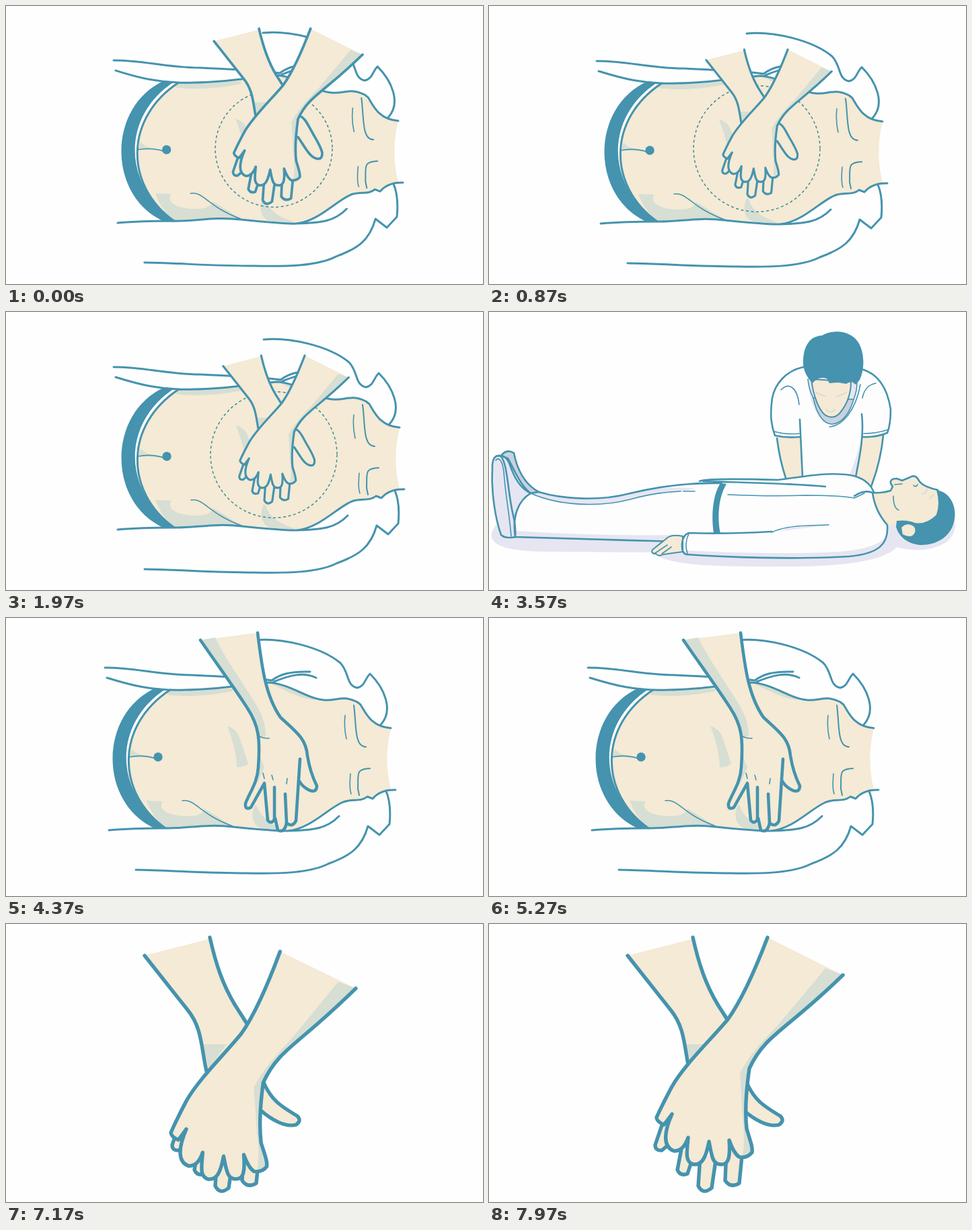
An HTML page that plays this animation: 709 px wide and 414 px high, repeating every 8000 ms.

```html
<!DOCTYPE html>
<html lang="en">
<head>
<meta charset="utf-8">
<title>Chest compressions</title>
<style>
html, body { margin: 0; width: 100%; height: 100%; overflow: hidden; background: #fefefe; }
svg { display: block; width: 709px; height: 414px; }
path, circle { fill: none; stroke-linecap: round; stroke-linejoin: round; }
.line { stroke: #4593ae; stroke-width: 3; }
#patient .line { stroke-width: 2.6; }
.thin { stroke: #4593ae; stroke-width: 1.6; }
.bold { stroke: #4593ae; stroke-width: 5.4; }
.skin { fill: #f4ead5; }
.shade { fill: #d7ded3; }
.dusk { fill: #c9d2de; }
.soft { fill: #e6e6f2; }
.cloth { fill: #fdfdfe; }
.teal { fill: #4593ae; }
.faint { stroke: #d3d9d8; stroke-width: 1.6; }
</style>
</head>
<body>
<svg viewBox="0 0 709 414">
<defs>
  <g id="torso">
    <path class="skin" d="M257 115C300 118 350 110 403 104C435 106 460 128 485 130C505 132 512 122 535 133C548 148 556 168 585 172C577 205 578 235 585 263C570 264 562 278 550 274C540 283 525 276 512 283C490 293 465 322 432 325C400 322 370 318 350 319C310 314 280 322 250 321C176 268 176 168 257 115Z"/>
    <path class="shade" d="M222 280L246 281C236 296 262 304 285 303C300 303 306 298 308 292L350 318L300 317L248 320Q230 302 222 280Z"/>
    <path class="shade" d="M383 286C376 302 380 316 392 321L438 325C412 318 392 308 386 288Z"/>
    <path class="shade" d="M257 116L350 113L350 117C315 124 280 126 252 122Z"/>
    <path class="shade" d="M342 169Q355 172 360 186L373 225Q366 231 356 230Q356 205 342 169Z"/>
    <path class="shade" d="M405 105C440 107 462 124 482 130C455 132 430 116 405 105ZM197 214L200 203Q206 212 232 217Z"/>
    <path class="teal" d="M236 112C150 150 150 285 236 322L252 321C172 267 172 165 250 114Z"/>
    <path class="line" d="M257 115C176 168 176 268 250 321"/>
    <circle class="teal" cx="239" cy="215" r="6.7"/>
    <path class="thin" d="M196 215Q217 211 234 217M275 280C295 277 300 300 350 318M517 153Q515 172 519 188M525 240Q523 262 526 270"/>
    <path class="line" style="stroke-width:2" d="M530 138C534 165 530 200 548 200M554 232C532 233 537 240 536 262L538 272"/>
    <path class="line" d="M160 82C200 81 240 93 290 93C340 96 380 96 408 101C420 92 435 87 465 88M411 103C435 93 455 88 474 97M163 97C195 107 230 117 280 115C325 115 360 108 403 104C435 106 460 128 485 130C505 132 512 122 535 133L540 137C548 150 556 170 585 172"/>
    <path class="line" d="M383 41C420 37 480 50 510 75C524 90 518 108 535 112C547 109 546 99 554 91C575 112 590 145 570 167"/>
    <path class="line" d="M166 324C200 321 225 321 250 321C280 322 310 314 350 319C380 322 420 326 432 325C470 324 490 322 508 303M432 325C465 322 490 293 512 283C525 276 540 283 550 274L558 277Q570 263 592 264M206 383C260 384 310 388 370 388C420 389 465 388 492 374C525 362 542 350 551 318L568 331L583 315Q586 285 578 266"/>
  </g>

  <g id="under">
    <path class="skin" d="M206 47L303 22C312 60 322 90 340 120L361 153L300 222C292 185 292 160 278 140Z"/>
    <path class="shade" d="M293 179L328 179L301 216Z"/>
    <path class="bold" d="M206 47L270 128C292 155 290 185 298 219L304 223M303 20C312 60 322 90 340 120L361 153"/>
    <path class="skin bold" d="M262 285L247 329Q247 338 257 337L264 331L272 300M286 335L280 366Q284 376 295 372L304 345M314 345L311 390Q318 404 331 393L338 345M353 335L351 382Q359 394 372 386L377 335"/>
  </g>

  <g id="over">
    <path class="skin" d="M414 20L526 76C440 160 410 165 387 215Q379 270 383 305C389 325 392 332 391 340Q384 349 372 347Q364 342 357 322C359 350 355 358 346 358C332 359 331 345 327 324C322 350 316 359 304 358C291 355 294 340 296 318C291 332 285 338 275 338C258 332 260 310 272 283L260 299Q249 294 249 288Q258 268 272 242C290 210 330 172 355 142C378 110 398 62 414 20Z"/>
    <path class="shade" d="M500 66L526 76C440 160 410 165 387 215Q379 270 383 305L391 338Q384 347 377 345Q381 320 377 290L373 222Q388 192 430 150Z"/>
    <path class="bold" d="M526 76C440 160 410 165 387 215Q379 270 383 305C389 325 392 332 391 340Q384 349 372 347Q364 342 357 322C359 350 355 358 346 358C332 359 331 345 327 324C322 350 316 359 304 358C291 355 294 340 296 318C291 332 285 338 275 338C258 332 260 310 272 283L260 299Q249 294 249 288Q258 268 272 242C290 210 330 172 355 142C378 110 398 62 414 20"/>
  </g>
</defs>

<g id="press">
  <use id="chest" href="#torso"/>
  <circle id="ring" cx="398" cy="212.5" r="94" stroke="#3f8b97" stroke-width="1.5" stroke-dasharray="4 3.6" style="stroke-linecap:butt"/>
  <g id="pump">
    <g transform="translate(167 20) scale(.69)">
      <use href="#under"/>
      <path class="skin bold" d="M387 208C402 208 410 232 420 248C428 262 436 275 439 287Q440 301 430 301C412 299 402 275 387 254"/>
      <use href="#over"/>
    </g>
  </g>
</g>

<g id="patient">
  <path class="soft" d="M12 315C-8 340 5 357 90 357L245 358C258 374 310 379 400 379C510 381 585 374 606 350C645 362 700 350 692 310L600 300L280 325Z"/>

  <path class="skin" d="M428 186L463 188L466 248L441 248Q432 220 428 186ZM555 187L586 183Q582 220 566 266L544 246Z"/>
  <path class="line" d="M428 188Q432 220 441 247M586 184Q582 225 566 265"/>
  <path class="cloth" d="M467 82C440 88 425 108 421 128C417 155 420 170 425 184L463 187L466 248L545 248L555 186L592 180Q597 168 597 145C592 112 578 92 554 85Z"/>
  <path class="soft" d="M553 188L545 248L533 247Q546 222 553 188Z"/>
  <path class="line" d="M467 82C440 88 425 108 421 128C417 155 420 170 425 184Q443 188 462 186M554 85C578 92 592 112 597 145Q597 168 592 180Q575 187 556 186M462 160L466 246M554 152C558 185 550 220 545 246"/>
  <path class="thin" d="M424 178Q442 183 461 181M557 181Q576 181 594 175M434 116C446 104 458 112 461 138M555 128C558 112 567 108 575 106"/>
  <path class="soft" d="M474 92C472 130 490 167 510 167C530 165 548 135 547 100Z"/>
  <path class="dusk thin" d="M482 128C487 152 497 167 510 167C524 166 536 152 542 130Z"/>
  <path class="thin" d="M474 100C475 112 478 120 482 128M547 105Q547 118 542 130M506 171C525 170 545 147 552 108"/>
  <path class="skin line" style="stroke-width:2" d="M479 100C482 125 490 145 499 153Q511 161 521 151C532 138 538 122 538 104Z"/>
  <path class="faint" d="M486 120L500 126M517 126L531 120M501 145Q508 153 514 145"/>
  <path class="teal" d="M467 72C468 50 477 36 495 35C511 25 546 26 554 57C558 72 557 88 551 101L545 108L538 103L531 107L519 105L506 106L502 99Q490 95 481 106C472 97 466 85 467 72Z"/>

  <path class="dusk line" d="M18 214Q26 203 37 210C42 235 52 256 74 268L62 270C46 258 38 235 28 218Z"/>
  <path class="soft line" d="M14 214Q25 213 30 225C38 248 46 262 62 270C45 280 34 302 39 335L22 335Z"/>
  <path class="cloth" d="M62 270L74 268C110 279 165 282 210 270C255 259 300 254 345 255L313 252Q325 247 430 250C470 245 495 239 530 242C552 244 566 254 572 268C574 290 585 305 592 317C594 345 580 360 535 364C450 369 350 365 293 361L285 342C200 340 100 337 39 335C33 300 45 280 62 270Z"/>
  <path class="soft" d="M40 326Q160 334 290 332L285 341Q160 340 40 335ZM62 270L74 268C110 279 165 282 210 270Q255 258 307 263L285 268Q250 269 210 279C165 291 105 289 62 270ZM292 355Q430 362 520 357Q575 353 591 334C588 354 565 363 520 364Q400 368 293 361ZM430 327Q455 317 505 318Q470 321 430 327Z"/>
  <path class="soft line" d="M5 235C4 217 10 212 18 215C28 228 28 270 36 303Q40 320 39 335Q25 338 18 332C10 310 3 270 5 235Z"/>
  <path class="thin" d="M10 221C15 215 20 222 22 238C24 270 30 298 33 334"/>
  <path class="line" d="M62 270C45 280 34 302 39 335C100 337 200 340 285 342M62 270L74 268C110 279 165 282 210 270C255 259 300 254 345 255M313 252Q325 247 430 250C470 245 495 239 530 242C552 244 566 254 572 268M318 252C380 254 450 255 500 260"/>
  <path class="thin" d="M62 270C105 289 165 291 210 279Q250 268 285 267M289 267L306 267M355 272Q420 275 470 273Q520 273 543 277L558 270M420 328Q440 319 475 318L505 317"/>
  <path class="teal" d="M344 255L353 256C341 276 339 305 344 330L334 330C330 300 333 272 344 255Z"/>
  <path class="skin line" style="stroke-width:2" d="M288 334Q270 330 263 338L243 354Q240 360 248 360Q252 365 259 361L288 357Z"/>
  <path class="thin" d="M247 359L265 347M257 360L271 350"/>
  <path class="line" d="M420 327Q350 331 297 329Q288 332 287 345Q286 359 293 361C350 365 450 369 535 364C580 360 594 345 592 318"/>
  <path class="thin" d="M297 330Q290 345 295 360"/>

  <path class="skin" d="M570 269Q585 270 597 266L597 256Q595 248 608 248L614 251L626 246Q634 241 639 251Q644 260 667 265L674 300L640 320L592 317C582 305 573 290 570 269Z"/>
  <path class="line" d="M543 274Q558 264 570 269Q585 270 597 266L600 260L597 255Q596 248 606 248L614 251L626 246Q634 241 639 251Q644 260 667 265M570 269C573 290 582 306 592 317"/>
  <path class="thin" d="M601 274Q601 292 609 295M603 257L614 256M631 258Q634 262 637 257"/>
  <path class="faint" d="M643 271Q650 271 651 263M655 278L661 272"/>
  <path class="teal" d="M665 265C686 268 695 290 692 308C688 335 665 347 642 347C625 346 610 337 605 320L606 311Q622 309 633 314Q650 317 665 302Q671 285 665 265Z"/>
  <path class="skin thin" d="M613 320C622 311 637 317 634 328C630 338 620 335 615 332"/>
</g>

<g id="place">
  <use href="#torso" x="-13" y="-8"/>
  <path class="skin" d="M289 33L374 22C380 70 385 115 408 148C432 170 446 180 448 205Q452 230 462 250Q459 260 452 257Q441 252 436 243L431 302Q426 312 418 307Q414 321 404 316L399 300Q394 308 389 301L384 246L364 282Q355 287 356 276C362 260 374 245 375 222C378 180 376 160 358 133C340 105 318 75 289 33Z"/>
  <path class="shade" d="M289 33L311 29C325 60 355 100 374 133Q387 155 386 178L376 178C376 160 365 143 358 133ZM375 200L384 222Q377 240 368 255Q375 235 375 200Z"/>
  <path class="bold" style="stroke-width:4.6" d="M289 33C318 75 340 105 358 133C376 160 378 180 375 222C374 245 362 260 356 276Q355 287 364 282L384 246L389 301Q394 308 399 300L399 252M400 298L404 316Q414 321 417 305L415 262M418 306Q426 312 431 302L437 210M436 243Q441 252 452 257Q462 260 462 250Q452 230 448 205C446 180 432 170 408 148C385 115 380 70 374 22"/>
  <path class="thin" d="M376 176Q383 180 391 179M382 231L384 239M395 234L397 241M418 239L417 247"/>
</g>

<g id="lock">
  <path class="skin bold" d="M383 236C394 262 408 271 433 286Q440 293 431 299C415 303 395 292 378 277"/>
  <use href="#under"/>
  <use id="top" href="#over"/>
</g>
</svg>
<script>
const LOOP = 8000, BEAT = 550;
const scenes = [['press', 0], ['patient', 2070], ['place', 4370], ['lock', 6570], ['', LOOP]];
const el = id => document.getElementById(id);
const set = (id, name, value) => el(id).setAttribute(name, value);

function draw(now) {
  // Motion advances ten times a second.
  const t = Math.max(0, Math.floor((now % LOOP + 30) / 100) * 100 - 30);
  for (let i = 0; i < scenes.length - 1; i++) {
    const [id, start] = scenes[i];
    el(id).style.display = t >= start && t < scenes[i + 1][1] ? '' : 'none';
  }

  const lift = (1 - Math.cos(2 * Math.PI * (t - 870) / BEAT)) / 2;
  const size = .845 + .166 * lift;
  set('pump', 'transform', `translate(397 234) scale(${size}) translate(-397 -234)`);
  set('ring', 'r', 94 - 7.5 * lift);
  set('chest', 'transform', `translate(160 ${-lift}) scale(${1 - .005 * lift} 1) translate(-160 0)`);

  const rise = Math.min(1, Math.max(0, (t - 6570) / 1400)) ** 1.5;
  const rest = 1 - rise;
  set('top', 'transform', `translate(${-6.5 * rest} ${29.5 * rest}) rotate(${-.8 * rest} 387 215)`);
  requestAnimationFrame(tick);
}

const begin = performance.now();
function tick() { draw(performance.now() - begin); }
tick();
</script>
</body>
</html>
```
